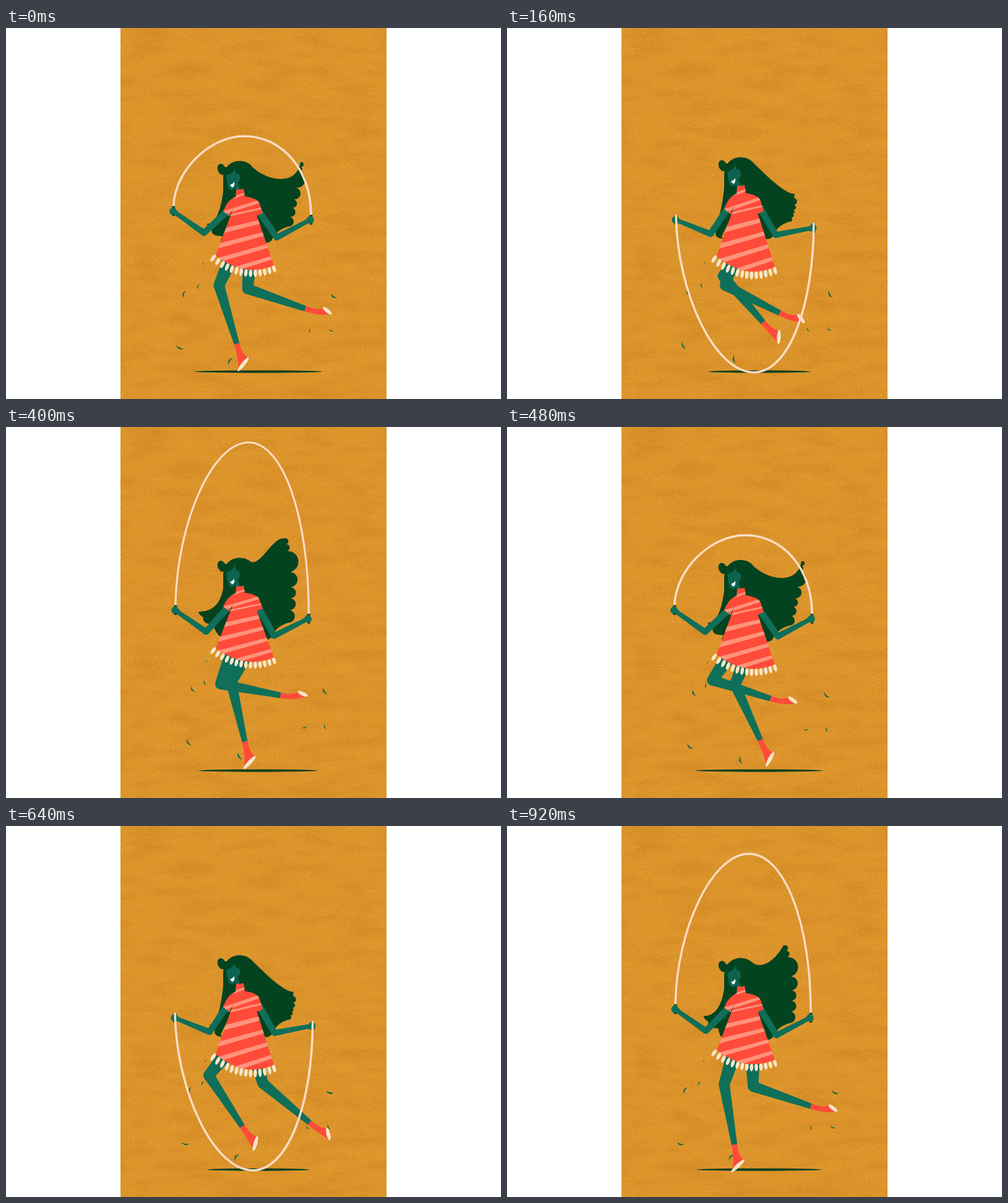
Write an HTML page with a canvas that moves like this. It is 800 by 600 pixels and loops after 960 ms.

```html
<!DOCTYPE html>
<html lang="en">
<head>
<meta charset="utf-8">
<title>Skipping rope</title>
<style>
html, body { margin: 0; width: 100%; height: 100%; overflow: hidden; background: #fff; }
svg, canvas { position: absolute; left: 0; top: 0; width: 800px; height: 600px; }
canvas { will-change: transform; }
</style>
</head>
<body>
<svg viewBox="0 0 800 600">
  <defs>
    <filter id="fibre" x="0" y="0" width="1" height="1" color-interpolation-filters="sRGB">
      <feTurbulence type="fractalNoise" baseFrequency=".015 .05" numOctaves="5" seed="4"/>
      <feColorMatrix values="0 0 0 0 .7  0 0 0 0 .38  0 0 0 0 .03  .45 0 0 0 -.17"/>
    </filter>
    <filter id="speck" x="0" y="0" width="1" height="1" color-interpolation-filters="sRGB">
      <feTurbulence type="fractalNoise" baseFrequency=".4" numOctaves="3" seed="9"/>
      <feColorMatrix values="0 0 0 0 .95  0 0 0 0 .74  0 0 0 0 .42  1.5 0 0 0 -.82"/>
    </filter>
  </defs>
  <rect x="185" width="430" height="600" fill="#dc942a"/>
  <rect x="185" width="430" height="600" filter="url(#fibre)"/>
  <rect x="185" width="430" height="600" filter="url(#speck)"/>
</svg>
<canvas id="stage" width="800" height="600"></canvas>
<script>
const c = document.getElementById('stage').getContext('2d');
const SKIN = '#0f6f59', FACE = '#0d6350', HAIR = '#04431f', RED = '#ff4b39',
      PINK = '#ff937b', CREAM = '#f8e6c8', ROPE = '#fbdcc6', LEAF = '#0a6a45';
const LOOP = 960, JUMP = 480, STEP = 40;
let t = 0, p = 0; // time in the loop and in the current jump

const beat = peak => Math.cos((p - peak) / JUMP * 2 * Math.PI);
const wave = (mean, amp, peak) => mean + amp * beat(peak);
const pulse = (peak, sharp) => Math.max(0, beat(peak)) ** sharp;
const slow = peak => Math.cos((t - peak) / LOOP * 2 * Math.PI);

// Smooth closed curve through keys of [time, ...values]
function tween(keys, time, period) {
  const n = keys.length;
  const key = i => {
    const turn = Math.floor(i / n), [k, ...v] = keys[i - turn * n];
    return [k + turn * period, ...v];
  };
  let i = n - 1;
  while (i > 0 && keys[i][0] > time) i--;
  const [a, b, d, e] = [key(i - 1), key(i), key(i + 1), key(i + 2)];
  const span = d[0] - b[0], u = (time - b[0]) / span, s = u * u * (3 - 2 * u);
  return b.slice(1).map((v, j) => {
    const w = d[j + 1];
    const m0 = (w - a[j + 1]) / (d[0] - a[0]) * span;
    const m1 = (e[j + 1] - v) / (e[0] - b[0]) * span;
    return v + (w - v) * s + u * (1 - u) * (m0 * (1 - u) - m1 * u);
  });
}

// Key points: time, then value or x, y
const BOB = [[0, 0], [80, 4], [160, -6], [320, -9.5], [400, -3.5]];
const CREST = [[0, 385, 175], [80, 403, 410], [160, 399, 557], [320, 389, 109], [400, 392, 25], [440, 391, 45]];
const LOCK = [[0, 477, 217], [80, 467, 290], [160, 462, 268], [320, 450, 174], [400, 450, 180], [440, 448, 193]];
const NEAR = [[0, 373, 511], [160, 441, 461], [400, 444, 434], [560, 402, 454], [640, 382, 486], [800, 371, 513]];
const FAR = [[0, 484, 454], [160, 414, 476], [400, 386, 509], [560, 447, 497], [640, 491, 480], [800, 496, 460]];

const leaf = (x, y, size, turn, swing, peak) => ({ x, y, size, turn, swing, peak });
const LEAVES = [
  leaf(295, 426, 12, 85, 38, 820), leaf(316, 415, 9, 95, 32, 750),
  leaf(321, 379, 5, 110, 40, 700), leaf(288, 512, 13, 32, 36, 260),
  leaf(370, 534, 13, 100, 45, 800), leaf(523, 429, 13, 36, 30, 260),
  leaf(487, 487, 8, 40, 55, 900), leaf(521, 486, 9, 48, 28, 470)
];

function fill(color, draw) {
  c.fillStyle = color;
  c.beginPath();
  draw();
  c.fill();
}
const dot = (x, y, rx, ry = rx, a = 0) => c.ellipse(x, y, rx, ry, a, 0, 7);
const poly = pts => { pts.forEach((q, i) => i ? c.lineTo(...q) : c.moveTo(...q)); c.closePath(); };

// Middle joint of a two-part limb
function joint([ax, ay], [bx, by], la, lb, side) {
  const d = Math.hypot(bx - ax, by - ay), ux = (bx - ax) / d, uy = (by - ay) / d;
  const along = (la * la - lb * lb + d * d) / (2 * d);
  const out = side * Math.sqrt(Math.max(0, la * la - along * along));
  return [ax + ux * along - uy * out, ay + uy * along + ux * out];
}
function bone([ax, ay], [bx, by], wa, wb) {
  const l = Math.hypot(bx - ax, by - ay), nx = (ay - by) / l / 2, ny = (bx - ax) / l / 2;
  poly([[ax + nx * wa, ay + ny * wa], [bx + nx * wb, by + ny * wb],
        [bx - nx * wb, by - ny * wb], [ax - nx * wa, ay - ny * wa]]);
}
function limb(a, b, d, wa, wb, wd) {
  fill(SKIN, () => dot(...b, wb / 2));
  fill(SKIN, () => bone(a, b, wa, wb));
  fill(SKIN, () => bone(b, d, wb, wd));
}

function drawLeg(keys, hip) {
  const ankle = tween(keys, t, LOOP);
  const knee = joint(hip, ankle, 70, 99, 1);
  limb(hip, knee, ankle, 26, 17.5, 9);
  // The foot lies in the frame of the shin and flexes as the shin turns upright
  const a = Math.atan2(ankle[1] - knee[1], ankle[0] - knee[0]);
  const flex = 8 - 20 * Math.sin(a) ** 2;
  c.save();
  c.translate(...ankle);
  c.rotate(a);
  fill(RED, () => {
    c.moveTo(-.5, -4.5);
    c.quadraticCurveTo(18, -3, 27, -11);
    c.lineTo(42, -flex);
    c.quadraticCurveTo(27, 4, -.5, 4.5);
    c.closePath();
  });
  fill(CREAM, () => dot(34.5, -(11 + flex) / 2, Math.hypot(15, 11 - flex) / 2 + 1, 3.1, Math.atan2(11 - flex, 15)));
  c.restore();
}

function drawHair(bob) {
  const [tx, ty] = tween(LOCK, p, JUMP);
  const ex = 456, ey = 321 + bob * 1.3;
  const lx = wave(320, 14, 95), ly = wave(310, 18, 92);
  c.save();
  fill(HAIR, () => {
    c.moveTo(351, 245 + bob);
    c.bezierCurveTo(351, 222 + bob, 366, 215 + bob, 378, 215 + bob);
    c.quadraticCurveTo(388, 215 + bob, 395, 221 + bob);
    c.bezierCurveTo(411, 221 + bob + wave(12, 13, 60), tx - 20 + 11 * pulse(0, 4), ty - 5 + 50 * pulse(0, 4), tx - 1, ty);
    // Scalloped edge from the top lock down to the lower corner
    let x0 = tx + 2, y0 = ty;
    c.lineTo(x0, y0);
    for (const f of [.07, .15, .4, .58, .71, .85, 1]) {
      const x = (1 - f) ** 2 * tx + 2 * f * (1 - f) * 468 + f * f * ex;
      const y = ty + (ey - ty) * f;
      const dx = x - x0, dy = y - y0, ox = dy * .6, oy = -dx * .6;
      c.bezierCurveTo(x0 + dx * .1 + ox, y0 + dy * .1 + oy, x - dx * .1 + ox, y - dy * .1 + oy, x, y);
      [x0, y0] = [x, y];
    }
    c.quadraticCurveTo(436, ey + 6, 429, 344 + bob);
    c.quadraticCurveTo(422, 349 + bob, 417, 347 + bob);
    c.lineTo(400, 300 + bob);
    c.lineTo(368, 300 + bob);
    c.lineTo(347, 343 + bob);
    c.quadraticCurveTo(lx + 27, ly + 34, lx + 24, ly + 20);
    c.quadraticCurveTo(lx + 6, ly + 20, lx + 8, ly + 9);
    c.quadraticCurveTo(lx + 2, ly + 6, lx, ly);
    c.quadraticCurveTo(344, ly + 1, 351, 265 + bob);
    c.closePath();
  });
  c.restore();
}

function drawHead(bob) {
  c.save();
  c.translate(0, bob);
  fill(HAIR, () => dot(348.5, 228.5, 6.5, 9, -.35));
  fill(HAIR, () => poly([[346, 237], [358, 238], [368, 226], [354, 225]]));
  fill(FACE, () => {
    c.moveTo(356, 238);
    c.quadraticCurveTo(367, 236, 370, 226);
    c.lineTo(371, 235);
    c.quadraticCurveTo(378, 234, 378, 242);
    c.quadraticCurveTo(378, 249, 374, 250);
    c.lineTo(380, 266);
    c.lineTo(373, 266);
    c.lineTo(371, 259);
    c.quadraticCurveTo(364, 265, 360, 260);
    c.quadraticCurveTo(357, 250, 356, 238);
  });
  fill('#fff', () => {
    c.moveTo(362, 254);
    c.quadraticCurveTo(366, 253, 369, 249);
    c.quadraticCurveTo(370, 256, 366, 258);
    c.quadraticCurveTo(364, 257, 362, 254);
  });
  c.restore();
}

function drawStripe(x1, y1, x2, y2, w) {
  fill(PINK, () => poly([[x1, y1 - w / 2], [x2, y2 - w * .4], [x2, y2 + w * .4], [x1, y1 + w / 2]]));
}

// Drawn at rest, then stretched between the collar and the swinging hem
function drawDress(bob) {
  const stretch = (wave(111.5, 10.5, 88) - bob) / 114;
  c.save();
  c.translate(0, 260 + bob);
  c.scale(1, stretch);
  c.translate(0, -260);
  for (let i = 0; i < 14; i++) {
    const u = i / 13, v = 1 - u, a = .6 - .9 * u;
    const x = 337 + 95 * u, y = v * v * 367 + 2 * u * v * 403 + u * u * 383;
    fill(CREAM, () => dot(x - Math.sin(a) * 4, y + Math.cos(a) * 4, 2.8, 6.6, a));
  }
  c.beginPath();
  c.moveTo(372, 261);
  c.quadraticCurveTo(378, 262, 384, 260);
  c.lineTo(386, 272);
  c.quadraticCurveTo(407, 275, 410, 284);
  c.lineTo(415, 299);
  c.lineTo(405, 303);
  c.lineTo(401, 290);
  c.lineTo(433, 382);
  c.quadraticCurveTo(385, 402, 339, 366);
  c.lineTo(368, 289);
  c.lineTo(361, 303);
  c.lineTo(351, 296);
  c.quadraticCurveTo(358, 277, 371, 273);
  c.closePath();
  c.fillStyle = RED;
  c.fill();
  c.clip();
  drawStripe(368, 274, 388, 267, 4);
  drawStripe(350, 299, 410, 280, 6);
  for (let i = 0; i < 5; i++) {
    const y = 307 + 22.5 * i;
    drawStripe(340, y, 432, y - 20 - 2 * i, i ? 7.5 : 3.5);
  }
  c.restore();
}

function drawRope([lx, ly], [rx, ry]) {
  const [mx, my] = tween(CREST, p, JUMP);
  const mix = (a, b, f) => a + (b - a) * f;
  c.strokeStyle = ROPE;
  c.lineWidth = wave(3.3, .4, 80);
  c.beginPath();
  c.moveTo(lx, ly);
  c.bezierCurveTo(lx + 2, mix(ly, my, .5), mix(mx, lx, .5), my, mx, my);
  c.bezierCurveTo(mix(mx, rx, .57), my, rx, mix(ry, my, .57), rx, ry);
  c.stroke();
}

function drawArm(shoulder, hand, end, side) {
  const [x, y] = hand;
  c.strokeStyle = '#07462f';
  c.lineWidth = 4.5;
  c.beginPath();
  c.moveTo(...end);
  c.lineTo(x + 1, y + 8);
  c.stroke();
  limb(shoulder, joint(shoulder, hand, 50.5, 61.5, side), hand, 11, 10, 6.5);
  fill(SKIN, () => dot(x, y, 5.5, 6.2, -side * .4));
  fill(SKIN, () => dot(x - 4 * side, y + 2, 4));
}

function drawLeaf({ x, y, size, turn, swing, peak }) {
  c.save();
  c.translate(x + size * .6 * slow(x < 400 ? 450 : 870), y + size * .5 * beat(60));
  c.rotate((turn + swing * slow(peak)) * Math.PI / 180);
  fill(LEAF, () => {
    c.moveTo(-size / 2, -1.3);
    c.quadraticCurveTo(0, size * .12, size / 2, -1);
    c.quadraticCurveTo(0, size * .5, -size / 2, -1.3);
  });
  c.restore();
}

function draw() {
  const [bob] = tween(BOB, p, JUMP), dip = pulse(160, 2), front = p < 180;
  const left = [wave(272.5, -3.5, 50), 296 + 14 * dip];
  const right = [wave(491.5, 4, 110), 310 + 13 * dip];
  const ends = [left, right].map(([x, y]) => [x + 1, y - 8]);
  c.clearRect(0, 0, 800, 600);
  fill('#05401f', () => dot(407.7, 555.7, wave(89.5, 13.5, 0), 2));
  LEAVES.forEach(drawLeaf);
  if (!front) drawRope(...ends);
  drawHair(bob);
  drawLeg(FAR, [396, 352 + bob / 2]);
  drawLeg(NEAR, [372, 352 + bob / 2]);
  drawArm([357, 297 + bob], left, ends[0], -1);
  drawArm([409, 297 + bob], right, ends[1], 1);
  drawHead(bob);
  drawDress(bob);
  if (front) drawRope(...ends);
}

function tick() {
  t = Math.floor(performance.now() % LOOP / STEP) * STEP;
  p = t % JUMP;
  draw();
  requestAnimationFrame(tick);
}
tick();
</script>
</body>
</html>
```
